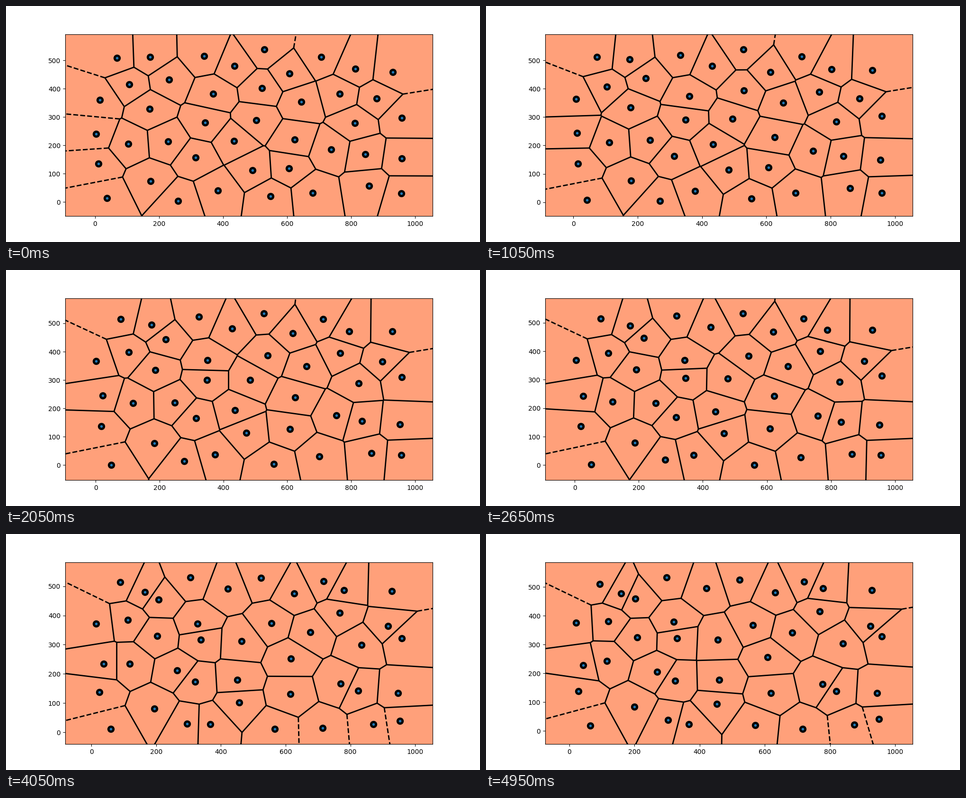
Write a matplotlib script that moves like this. It is 1000x500 px and loops after 5 s.

```python
import numpy as np
import matplotlib.pyplot as plt
from matplotlib.animation import FuncAnimation
from matplotlib.collections import LineCollection
from matplotlib.tri import Triangulation

FRAMES, INTERVAL = 100, 50
WIDTH, HEIGHT = 960, 540
TURN = np.radians(102)

# Each site: start x, start y, and its drift over one loop.
STRAIGHT = [
    (341.4, 515, -43, 18), (529.8, 538.2, -7.5, 17.2), (706.4, 511.6, 14, 6.4),
    (930.4, 458.4, -2, 30), (231.6, 431.8, -29.4, 27.2), (521, 401.8, 42, -34.6),
    (607, 453.4, 24.5, 27), (644, 353.6, 40, -12.6), (764, 382, 4, 33),
    (880, 365.2, 44, -1), (959.4, 297, 0, 31), (15, 360.2, -35, 15),
    (504.6, 288.7, -49.2, 27.7), (811.7, 278.7, 27.8, 24.6),
    (737.5, 185.5, 39.5, -23), (844.4, 169, -25.3, -31.2),
    (958.2, 154, -14, -23), (10.5, 135.6, 17, 2), (37, 14, 27, -32),
    (173.7, 74, 25.6, 9.6), (259.8, 4.2, 43, -42), (549, 20.8, 21.3, -40.5),
    (856.2, 57.4, 18.2, -36), (957.7, 31, 12.2, 10)]
CLOCKWISE = [
    (68.4, 508.3, 25, 1.5), (172.3, 511.6, -13.7, -34.6), (436.4, 480, -16, 15),
    (813.2, 470, -34.8, 25), (369.6, 382, -49.5, -3.2), (170.8, 328.6, 37.2, -4),
    (2.5, 240.4, 39.7, -12.5), (228.6, 213.8, 40.6, -9), (314.7, 157.2, 9.8, 16.6),
    (605.5, 119, 13, 12), (679.7, 32.4, 36, -25.7)]
COUNTERCLOCKWISE = [
    (107, 415, 12.3, -34.8), (344.4, 280.4, -14, 41), (104, 205.5, 11, 37),
    (435, 215.5, 25, -38.5), (623.3, 220.5, -15, 35.2), (384.4, 40.8, -17.7, -17.8),
    (492.7, 112.3, -40.2, -19)]


def bounce(value, size):
    """Fold a coordinate back into the box, as if reflected by its walls."""
    return size - abs(size - abs(value))


def glide(sites, turn, s):
    """Move along straight lines, or along arcs whose heading swings by turn."""
    x, y, dx, dy = np.array(sites).T
    share = np.expm1(1j * turn * s) / np.expm1(1j * turn) if turn else s
    z = x + 1j * y + share * (dx + 1j * dy)
    return np.column_stack([bounce(z.real, WIDTH), bounce(z.imag, HEIGHT)])


def sites_at(frame):
    s = frame / (FRAMES - 1)
    return np.vstack([glide(STRAIGHT, 0, s), glide(CLOCKWISE, -TURN, s),
                      glide(COUNTERCLOCKWISE, TURN, s)])


def voronoi_edges(points):
    """Return finite ridges and rays as the dual of the Delaunay mesh."""
    mesh = Triangulation(*points.T)
    a, b, c = (points[mesh.triangles[:, j]] for j in range(3))
    u, v = b - a, c - a
    uu, vv = (u * u).sum(axis=1), (v * v).sum(axis=1)
    det = 2 * (u[:, 0] * v[:, 1] - u[:, 1] * v[:, 0])
    centers = a + np.column_stack([v[:, 1] * uu - u[:, 1] * vv,
                                   u[:, 0] * vv - v[:, 0] * uu]) / det[:, None]
    reach = 2 * np.ptp(points, axis=0).max()
    ridges, rays = [], []
    for t, corners in enumerate(mesh.triangles):
        for j, other in enumerate(mesh.neighbors[t]):
            if other > t:
                ridges.append((centers[t], centers[other]))
            elif other < 0:
                dx, dy = points[corners[(j + 1) % 3]] - points[corners[j]]
                outward = np.array([dy, -dx]) / np.hypot(dx, dy)
                rays.append((centers[t], centers[t] + reach * outward))
    return ridges, rays


fig, ax = plt.subplots(figsize=(10, 5), dpi=100)
ax.set_facecolor("lightsalmon")
ridge_lines = LineCollection([], colors="k", linewidths=2)
ray_lines = LineCollection([], colors="k", linewidths=2, linestyles="dashed")
ax.add_collection(ridge_lines)
ax.add_collection(ray_lines)
discs, = ax.plot([], [], "ko", markersize=10)
dots, = ax.plot([], [], ".", color="tab:blue")


def update(frame):
    points = sites_at(frame)
    ridges, rays = voronoi_edges(points)
    ridge_lines.set_segments(ridges)
    ray_lines.set_segments(rays)
    for markers in (discs, dots):
        markers.set_data(*points.T)
    low, high = points.min(axis=0), points.max(axis=0)
    margin = 0.1 * (high - low)
    ax.set_xlim(low[0] - margin[0], high[0] + margin[0])
    ax.set_ylim(low[1] - margin[1], high[1] + margin[1])
    return ridge_lines, ray_lines, discs, dots


animation = FuncAnimation(fig, update, frames=FRAMES, interval=INTERVAL,
                          repeat=True, repeat_delay=0)
plt.show()
```
